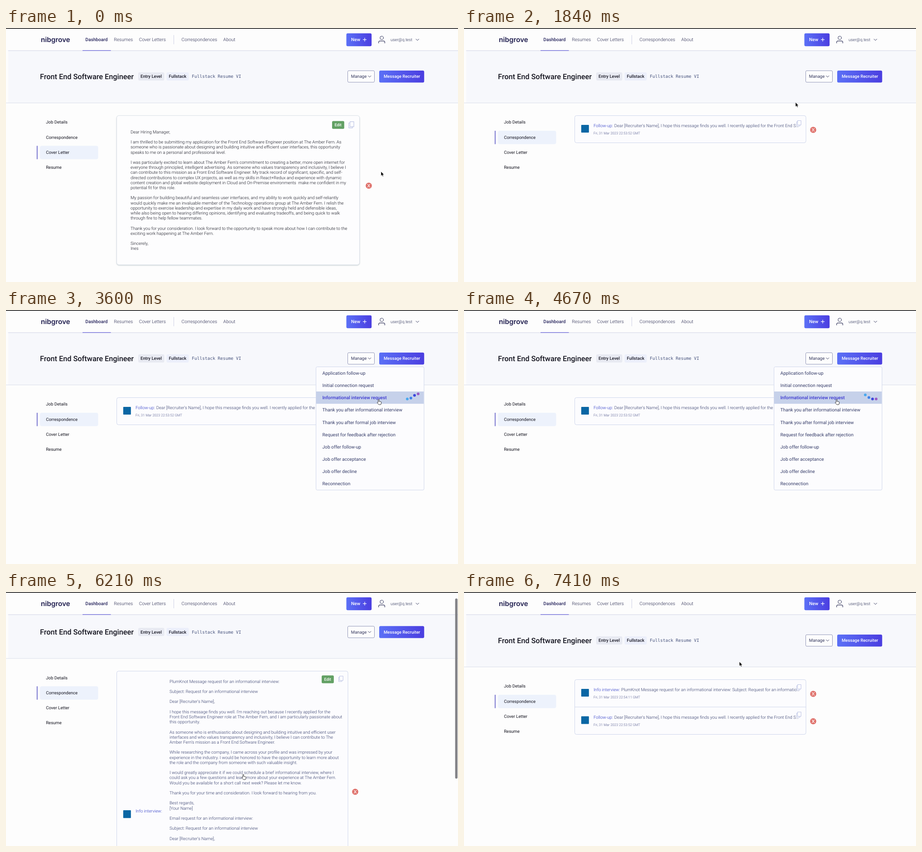
Recreate the animation shown at these times as an HTML page. Size 998 px wide and 561 px high, loop 7.45 s.

```html
<!DOCTYPE html>
<html lang="en">
<head>
<meta charset="utf-8">
<title>Job application</title>
<style>
html, body { margin: 0; width: 100%; height: 100%; overflow: hidden; background: #fdfdfd; }
svg { display: block; width: 998px; height: 561px; }
text { font: 300 9.575px Roboto, sans-serif; white-space: pre; text-rendering: geometricPrecision; fill: #2c3566; }
.nav { font-size: 10.17px; fill: #20224a; }
.on { font-weight: 500; fill: #25235c; }
.logo { font: 600 15.2px Inter, sans-serif; fill: #1f1d4e; }
.mail { font-size: 9.1px; fill: #20264f; }
.title { font-size: 16.3px; font-weight: 500; fill: #14141f; }
.tag { font-weight: 500; fill: #1c1c28; }
.mono { font: 9.53px "DejaVu Sans Mono", monospace; fill: #46527c; }
.btn { font-weight: 500; fill: #fff; }
.new { font-size: 10.17px; }
.edit { font-size: 9px; }
.plain { font-weight: 400; fill: #14141f; }
.manage { font-weight: 400; fill: #34375e; }
.letter { fill: #10111c; }
.head { font-size: 12.5px; font-weight: 700; fill: #14141f; }
.sub { font-size: 10.77px; font-weight: 700; fill: #14141f; }
.step { font-size: 10.77px; font-weight: 400; fill: #20202c; }
.item { font-size: 10.17px; font-weight: 400; fill: #343b68; }
.item.on { font-weight: 500; fill: #3a36cf; }
.kind { fill: #2532c4; }
.date { font-size: 7.66px; fill: #4a5188; }
.line { fill: none; stroke: #34375e; stroke-width: 1; stroke-linecap: round; stroke-linejoin: round; }
#card { filter: drop-shadow(0 1px .8px #c3cdcf); }
</style>
</head>
<body>
<svg id="stage" viewBox="0 0 998 561"></svg>
<script>
const company = 'The Amber Fern', network = 'PlumKnot';

const letter = `Dear Hiring Manager,

I am thrilled to be submitting my application for the Front End Software Engineer position at ${company}. As
someone who is passionate about designing and building intuitive and efficient user interfaces, this opportunity
speaks to me on a personal and professional level.

I was particularly excited to learn about ${company}'s commitment to creating a better, more open internet for
everyone through principled, intelligent advertising. As someone who values transparency and inclusivity, I believe I
can contribute to this mission as a Front End Software Engineer. My track record of significant, specific, and self-
directed contributions to complex UX projects, as well as my skills in React+Redux and experience with dynamic
content creation and global website deployment in Cloud and On-Premise environments  make me confident in my
potential fit for this role.

My passion for building beautiful and seamless user interfaces, and my ability to work quickly and self-reliantly
would quickly make me an invaluable member of the Technology operations group at ${company}. I relish the
opportunity to exercise leadership and expertise in my daily work and have strongly held and defensible ideas,
while also being open to hearing differing opinions, identifying and evaluating tradeoffs, and being quick to walk
through fire to help fellow teammates.

Thank you for your consideration. I look forward to the opportunity to speak more about how I can contribute to the
exciting work happening at ${company}.

Sincerely,
Ines`;

const followUp = `Dear [Recruiter's Name],

I hope this message finds you well. I recently applied for the Front End Software Engineer
position at ${company} and I wanted to express my strong interest in this opportunity. As
someone who is passionate about designing and building intuitive and efficient user interfaces,
this position speaks to me on a personal and professional level.

What drew me to ${company} is the company's commitment to creating a better, more
open internet for everyone through principled, intelligent advertising. I am excited about the
prospect of contributing to this mission as a Front End Software Engineer. With my experience
in React+Redux and dynamic content creation, as well as my ability to work quickly and self-
reliantly, I am confident that I would make a valuable addition to the Technology operations
group.

Thank you for your time and consideration. I would love the opportunity to discuss further how
I can contribute to the exciting work happening at ${company}.

Best,
[Your Name]`;

const greeting = `Subject: Request for an informational interview

Dear [Recruiter's Name],
`;
const closing = `experience in the industry. I would be honored to have the opportunity to learn more about
the role and the company from someone with such valuable insight.

I would greatly appreciate it if we could schedule a brief informational interview, where I
could ask you a few questions and learn more about your experience at ${company}.
Would you be available for a short call next week? Please let me know.

Thank you for your time and consideration. I look forward to hearing from you.

Best regards,
[Your Name]`;
const interview = `${network} Message request for an informational interview:

${greeting}
I hope this message finds you well. I'm reaching out because I recently applied for the
Front End Software Engineer role at ${company}, and I am particularly passionate about
this opportunity.

As someone who is enthusiastic about designing and building intuitive and efficient user
interfaces and who values transparency and inclusivity, I believe I can contribute to The
${company.slice(4)}'s mission as a Front End Software Engineer.

While researching the company, I came across your profile and was impressed by your
${closing}

Email request for an informational interview:

${greeting}
I recently submitted my application for the Front End Software Engineer position at The
${company.slice(4)}, and I am particularly interested in the role and the company's mission to
create a better, more open internet for everyone through principled, intelligent advertising.
As someone who values transparency and inclusivity, I believe I can contribute to this
mission as a Front End Software Engineer.

While researching the company, I came across your profile, and I was impressed by your
${closing}`;

const menuItems = ['Application follow-up', 'Initial connection request', 'Informational interview request',
  'Thank you after informational interview', 'Thank you after formal job interview',
  'Request for feedback after rejection', 'Job offer follow-up', 'Job offer acceptance',
  'Job offer decline', 'Reconnection'];
const pitch = 27.15;

// Drawing helpers; text is placed by the middle of its capitals.
const sizes = { title: 16.3, logo: 13, head: 12.5, sub: 10.75, step: 10.75, nav: 10.15, item: 10.15, date: 7.64 };
const text = (x, y, s, cls = '') =>
  `<text x="${x}" y="${y + 0.355 * (sizes[cls.split(' ')[0]] || 9.55)}" class="${cls}">${s}</text>`;
const lines = (x, y, s, cls) => s.split('\n').map((l, i) => text(x, y + 11.2 * i, l, cls)).join('');
const rect = (x, y, w, h, fill, r = 0, stroke = 'none') =>
  `<rect x="${x}" y="${y}" width="${w}" height="${h}" rx="${r}" fill="${fill}" stroke="${stroke}"/>`;
const path = (d, extra = '') => `<path class="line" d="${d}" ${extra}/>`;
const group = (id, body) => `<g id="${id}">${body}</g>`;
const remove = (x, y) => `<circle cx="${x}" cy="${y}" r="6.8" fill="#df716b"/>` +
  path(`M${x - 2.5} ${y - 3.2}l5 6.4m0 -6.4l-5 6.4`, 'style="stroke:#fff;stroke-width:1.2"');
const copy = (x, y, k = 1) => `<g transform="translate(${x} ${y}) scale(${k})">` +
  path('M2.8 .5h7.4v9.6h-7.4zM2.6 3H.5v9.5h7.2v-2.2', 'style="stroke:#bcc3e4"') + '</g>';
const edit = (x, y) => rect(x, y, 26.8, 17.2, '#62a064', 2.5) + text(x + 5.4, y + 8.6, 'Edit', 'btn edit');
const logoMark = y => rect(258.8, y - 8.6, 17, 17.2, '#0a66a4', 1);

const rowClosed = (y, kind, x, preview, date) => logoMark(y + 29) + text(286, y + 22.3, kind, 'kind') +
  text(x, y + 22.3, preview) + text(286, y + 39, date, 'date') + copy(734, y + 10.5) + remove(771, y + 31.5);
const rowOpen = (h, kind, x, body, date, removeY) => logoMark(193.5 + h / 2 - 0.5) +
  text(286, 193.5 + h / 2 - 7.2, kind, 'kind') + lines(x, 216, body) +
  text(286, 193.5 + h - 20.5, date, 'date') + edit(697, 203) + copy(734, 204) + remove(771, removeY);
const box = h => rect(244.5, 193.5, 510.5, h, '#fcfcfe', 4, '#cfd6ec');
const divider = y => path(`M244.5 ${y}H755`, 'style="stroke:#cfd6ec"');

const dateA = 'Fri, 31 Mar 2023 22:53:52 GMT', dateB = 'Fri, 31 Mar 2023 22:54:11 GMT';
const previewA = "Dear [Recruiter's Name], I hope this message finds you well. I recently applied for the Front End S…";
const previewB = `${network} Message request for an informational interview: Subject: Request for an informatio…`;
const rowA = y => rowClosed(y, 'Follow-up:', 331.8, previewA, dateA);
const tall = 632.5;

const views = {
  letter: group('card', rect(244.5, 193.5, 536, 329.5, '#fdfdfe', 5, '#dde2ea')) +
    lines(275, 229.4, letter, 'letter') + edit(720, 205.5) + copy(756.3, 206.3, 1.15) + remove(801, 348.3),
  empty: text(244.4, 213.3, 'You have no correspondences for this job application yet.', 'head') +
    text(244.4, 242, 'Generate a new correspondence:', 'sub') +
    text(244.4, 271, "1. Click the 'Message Recruiter' button", 'step') +
    text(244.4, 287.3, '2. Select the type of correspondence you would like to create.', 'step'),
  one: box(60) + rowA(193.5),
  oneOpen: box(275) + group('hover', rect(731, 202, 17, 17.5, '#e2e8f8', 2)) +
    rowOpen(275, 'Follow-up:', 345.4, followUp, dateA, 313),
  two: box(121) + divider(254) + rowClosed(193.5, 'Info interview:', 347, previewB, dateB) + rowA(254),
  twoOpen: box(tall + 60.5) + divider(193.5 + tall) +
    rowOpen(tall, 'Info interview:', 361, interview, dateB, 460) + rowA(193.5 + tall)
};

const colors = ['#4aa9ee', '#3f83ea', '#3c48dc', '#9a5bc4'];
const banner = rect(5, 50, 993, 115.5, '#f7f8fc') + path('M0 165.5H998', 'style="stroke:#dadeea"') +
  text(75, 107, 'Front End Software Engineer', 'title') +
  rect(292, 98, 57.5, 18, '#e8eaf2', 3) + text(297, 107, 'Entry Level', 'tag') +
  rect(354.5, 98, 49, 18, '#eceffb', 3) + text(359.5, 107, 'Fullstack', 'tag') +
  text(410.3, 107, 'Fullstack Resume VI', 'mono') +
  rect(754.5, 94.3, 59, 25.5, '#fdfdfd', 2.5, '#9297b8') + text(761.8, 107, 'Manage', 'manage') +
  path('M799.8 105.6l3 3l3 -3') +
  rect(824, 94, 99.3, 26.5, 'url(#blue)', 3) + text(834, 107, 'Message Recruiter', 'btn');
const tabs = group('tab', rect(75, 227, 128.5, 29.5, '#edf2fc', 4) + rect(68, 227, 1.4, 29.5, '#4540bd')) +
  ['Job Details', 'Correspondence', 'Cover Letter', 'Resume']
    .map((s, i) => text(88.2, 208 + 33.25 * i, s, 'plain')).join('');
const menu = rect(684.5, 125.5, 238.5, 272.2, '#fcfcfe', 3, '#d0d7ec') +
  group('pick', rect(685, 125.7, 237.5, pitch, '#c6d1ea')) +
  menuItems.map((s, i) => text(698.5, 139.3 + pitch * i, s, 'item')).join('') +
  group('dots', colors.map((c, i) => `<circle cx="${886 + 8 * i}" r="3" fill="${c}"/>`).join(''));
const header = rect(0, 0, 998, 50, '#fdfdfd') + rect(0, 0, 998, 1.5, '#000') +
  path('M5 50H998', 'style="stroke:#d0d3e6"') + rect(169, 49.2, 62.5, 1.1, '#5a54d8') +
  text(77, 26.5, 'nibgrove', 'logo') + text(175.3, 25.7, 'Dashboard', 'nav on') +
  text(238.3, 25.7, 'Resumes', 'nav') + text(293.8, 25.7, 'Cover Letters', 'nav') +
  path('M370.5 16V35.5', 'style="stroke:#cdd0e6"') +
  text(387.6, 25.7, 'Correspondences', 'nav') + text(479.8, 25.7, 'About', 'nav') +
  rect(751.5, 11.7, 55.7, 28.5, 'url(#blue)', 3) + text(762, 25.9, 'New', 'btn new') +
  path('M788.5 25.7h7m-3.5 -3.5v7', 'style="stroke:#fff;stroke-width:1.2"') +
  '<circle class="line" cx="829.6" cy="21.8" r="3.8"/>' +
  path('M822.8 33.2v-1.6a3 3 0 0 1 3 -3h7.6a3 3 0 0 1 3 3v1.6', 'style="stroke-width:1.2"') +
  text(849, 25.7, 'user@q.test', 'mail') + path('M905.2 24.4l3.2 3.2l3.2 -3.2');

const $ = id => document.getElementById(id);
$('stage').innerHTML = `<defs><linearGradient id="blue">
  <stop stop-color="#5b70f6"/><stop offset="1" stop-color="#4b3ee0"/></linearGradient></defs>` +
  rect(0, 0, 998, 561, '#fdfdfd') +
  group('page', banner + tabs + Object.keys(views).map(k => group(k, views[k])).join('') + group('menu', menu)) +
  group('header', header) + group('bar', rect(991.7, 0, 5.2, 398, '#828286', 2.6)) +
  group('cursor',
    '<path id="arrow" d="M0 0V9.6L2.2 7.5 3.7 11 5.3 10.3 3.9 7H6.7Z" fill="#000" stroke="#fff" stroke-width=".6"/>' +
    '<path id="hand" d="M2.8 7V1.4a1 1 0 0 1 2 0V4.8l4 .8q1.1 .3 1 1.5L9.2 10 8.5 12H4.2L.8 8.2Q.2 6.8 1.5 6.6z" ' +
    'fill="#fff" stroke="#222" stroke-width=".9"/>');

// Timeline in ms.
const loop = 7450;
const scenes = [[0, 'letter'], [400, 'empty'], [1750, 'one'], [2050, 'oneOpen'], [2720, 'one'],
  [4880, 'two'], [5880, 'twoOpen'], [7220, 'two']];
const menus = [{ from: 760, to: 1750, load: 960, item: 0 }, { from: 3040, to: 4880, load: 3360, item: 2 }];
// time, x, y, hand shown from here on
const moves = [[0, 828, 317, 0], [80, 828, 317, 0], [370, 130, 238, 1], [450, 130, 238, 0], [720, 868, 104, 1],
  [780, 868, 104, 1], [930, 806, 142, 1], [1750, 806, 142, 0], [2000, 560, 216, 1], [2080, 560, 216, 1],
  [2370, 739.5, 209, 1], [2500, 739.5, 209, 1], [2690, 620, 216, 1], [2750, 620, 216, 1], [3000, 868, 104, 1],
  [3080, 868, 104, 1], [3300, 819, 197, 1], [4900, 819, 197, 0], [5350, 566, 342, 0], [5640, 566, 342, 0],
  [5830, 522, 212, 1], [5920, 522, 212, 1], [6250, 520, 410, 1], [7010, 520, 410, 1], [7180, 540, 212, 1],
  [7240, 540, 212, 0], [7400, 608, 154, 0], [loop, 608, 154, 0]];
const scrolls = [[0, 0], [6170, 0], [6470, 137], [6700, 245], [7010, 245], [7170, 0], [loop, 0]];

const ease = u => u * u * (3 - 2 * u);
function between(keys, t, curve = ease) {
  const i = keys.findIndex(k => k[0] > t), a = keys[i - 1], b = keys[i];
  const u = curve((t - a[0]) / (b[0] - a[0]));
  return a.map((v, j) => v + (b[j] - v) * u).concat(a[3]);
}
const show = (id, on) => $(id).style.display = on ? '' : 'none';
const move = (id, x, y) => $(id).setAttribute('transform', `translate(${x} ${y})`);

function draw(t) {
  const scene = scenes.filter(s => s[0] <= t).pop()[1];
  for (const k in views) show(k, k === scene);
  move('tab', 0, scene === 'letter' ? 33.25 : 0);
  show('hover', t > 2330 && t < 2560);

  const open = menus.find(m => t >= m.from && t < m.to);
  show('menu', open);
  if (open) {
    const picked = t > open.load - 80, loading = t >= open.load, y = pitch * open.item;
    show('pick', picked);
    move('pick', 0, y);
    $('menu').querySelectorAll('.item').forEach((e, i) => e.classList.toggle('on', picked && i === open.item));
    show('dots', loading);
    const phase = 61 + (t - 1170) * 1.5395;
    [...$('dots').children].forEach((dot, i) => {
      const lift = Math.max(0, Math.sin((phase - 34 * i) * Math.PI / 180));
      dot.setAttribute('cy', 142.2 + y - 11.5 * lift);
    });
  }

  const scroll = between(scrolls, t, u => u)[1];
  move('page', 0, -scroll);
  show('bar', t >= 6170 && t < 7220);
  move('bar', 0, 2 + 0.65 * scroll);

  const at = between(moves, t), hand = at[4];
  move('cursor', at[1], at[2]);
  show('hand', hand);
  show('arrow', !hand);
}

const start = performance.now();
(function tick() {
  draw((performance.now() - start) % loop);
  requestAnimationFrame(tick);
})();
</script>
</body>
</html>
```
